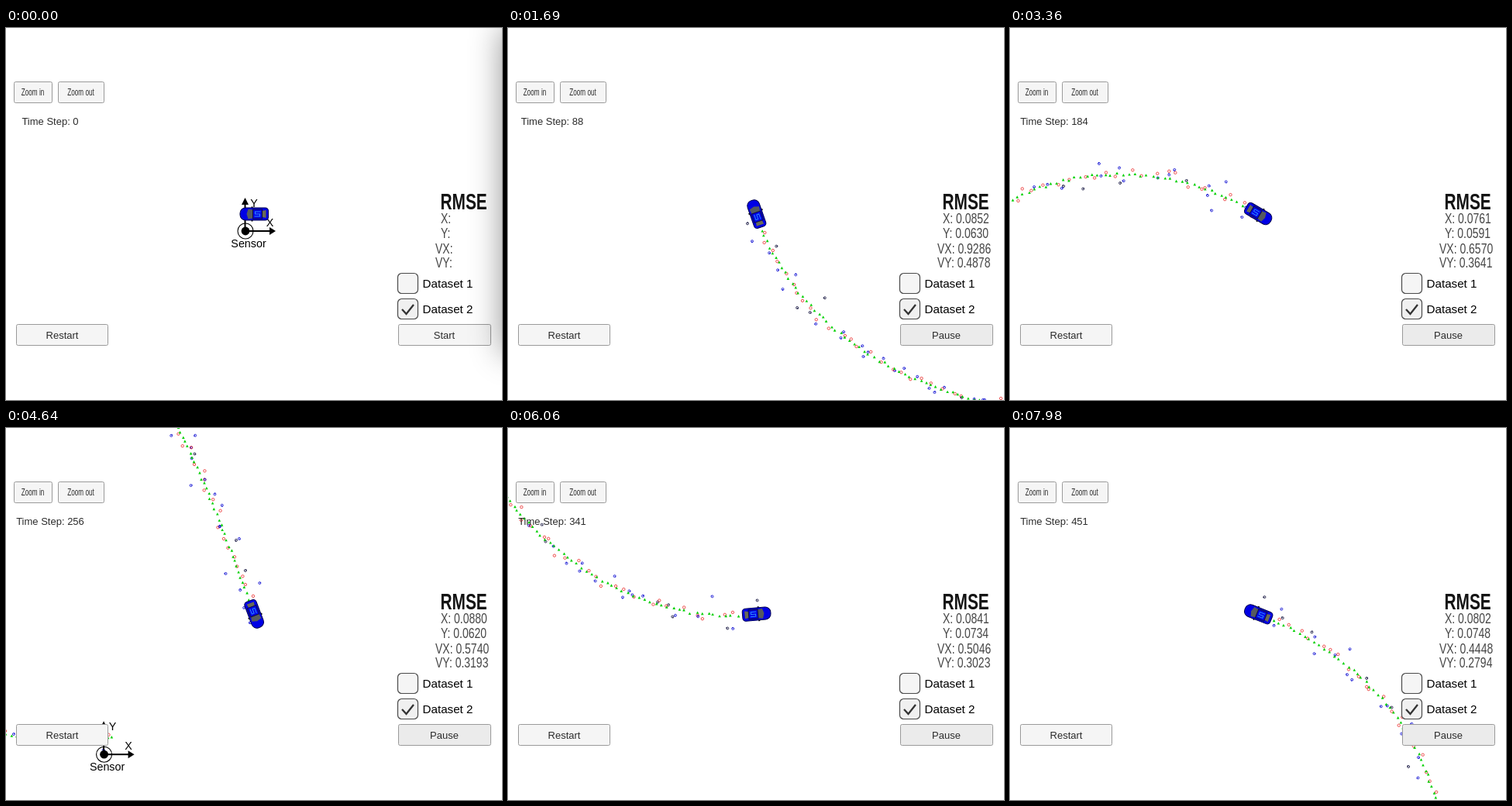
An HTML page with a canvas for the animation above (8 s loop, 640 px wide and 480 px high).

```html
<!DOCTYPE html>
<html lang="en">
<head>
<meta charset="utf-8">
<title>Sensor tracking</title>
<style>
  html, body { margin: 0; width: 100%; height: 100%; overflow: hidden; background: #fff; }
  #stage { position: relative; width: 640px; height: 480px; overflow: hidden; }
  canvas, svg { position: absolute; left: 0; top: 0; display: block; }
  text { font-family: "Liberation Sans", Arial, sans-serif; fill: #2c2c2c; }
  .button { fill: #f5f5f5; stroke: #9a9a9a; }
  .box { fill: #f5f5f5; stroke: #4a4a4a; stroke-width: 1.2; }
  .label { font-size: 13px; text-anchor: middle; }
  .small { font-size: 12px; text-anchor: middle; }
  .option { font-size: 15.2px; fill: #000; }
  .value { font-size: 17.5px; fill: #464646; }
  .title { font-size: 29px; font-weight: bold; fill: #141414; }
  #shade { position: absolute; left: 640px; top: 0; width: 60px; height: 420px; box-shadow: 0 0 40px rgba(0,0,0,.42); }
</style>
</head>
<body>
<div id="stage">
  <canvas id="world" width="640" height="480"></canvas>
  <svg width="640" height="480" viewBox="0 0 640 480">
    <g class="button">
      <rect x="10.5" y="69.5" width="49" height="27" rx="2"/>
      <rect x="67.5" y="69.5" width="59" height="27" rx="2"/>
      <rect x="13.5" y="382.5" width="118" height="27" rx="2"/>
      <rect id="runBox" x="506.5" y="382.5" width="119" height="27" rx="2"/>
    </g>
    <g class="box">
      <rect x="505.5" y="316.5" width="26" height="26" rx="5"/>
      <rect x="505.5" y="349.5" width="26" height="26" rx="5" style="fill:#f0f0f0"/>
    </g>
    <path d="M511 363L516.5 369L526 357" fill="none" stroke="#333" stroke-width="2.3"/>
    <text class="small" transform="translate(34.5 87) scale(.68 1)">Zoom in</text>
    <text class="small" transform="translate(96.5 87) scale(.68 1)">Zoom out</text>
    <text class="label" x="57" y="125" id="step"></text>
    <text class="label" x="72.5" y="401">Restart</text>
    <text class="label" x="565.5" y="401" id="run"></text>
    <text class="option" x="537.5" y="335">Dataset 1</text>
    <text class="option" x="537.5" y="368">Dataset 2</text>
    <text class="title" transform="translate(560.5 233.5) scale(.72 1)">RMSE</text>
    <text class="value" transform="translate(561 252) scale(.8 1)"></text>
    <text class="value" transform="translate(561 271) scale(.8 1)"></text>
    <text class="value" transform="translate(554 291) scale(.8 1)"></text>
    <text class="value" transform="translate(554 309) scale(.8 1)"></text>
  </svg>
  <div id="shade"></div>
</div>
<script>
const LOOP = 8000, LAST = 452, TAU = Math.PI * 2;
const NAMES = ['X:', 'Y:', 'VX:', 'VY:'];

// time, step, screen updates until the next row, then the four RMSE values
const TABLE = [
  [40, 0, 2, .19, .16, 3.87, 1.73],
  [120, 4, 21, .19, .16, 3.87, 1.73],
  [960, 48, 35, .1073, .0695, 1.2490, .6325],
  [2410, 131, 23, .0749, .0603, .7692, .4184],
  [3360, 184, 31, .0761, .0591, .6570, .3641],
  [4640, 256, 34, .0880, .0620, .5740, .3193],
  [6060, 341, 46, .0841, .0734, .5046, .3023],
  [7980, 451, 1, .0802, .0748, .4448, .2794],
  [8020, 453, 1, .0802, .0748, .4448, .2794]
];

const $ = id => document.getElementById(id);
const ctx = $('world').getContext('2d');
const values = document.querySelectorAll('.value');
const mix = (a, b, u) => a + (b - a) * u;

let seed = 20417;
function random() {
  seed = (seed * 1664525 + 1013904223) >>> 0;
  return seed / 4294967296;
}
const noise = sd => (random() + random() + random() - 1.5) * 2 * sd;

// Yaw rate is one sine wave over 500 steps, speed swings twice in that time.
const heading = k => Math.PI - 2.18 * (1 - Math.cos((k + 1.3) * TAU / 500));
const speed = k => (151 - 6.2 * Math.cos(k * TAU / 250)) * .05;

function makePath() {
  const path = [];
  let x = 11, y = 22;
  for (let k = 0; k <= LAST; k++) {
    path.push({ x, y });
    const mid = k + 1, angle = heading(mid);
    x += speed(mid) * Math.cos(angle);
    y += speed(mid) * Math.sin(angle);
  }
  return path;
}

// Lidar noise is even in all directions, radar noise follows range and bearing.
function measure(p, k) {
  const estimate = { x: p.x + noise(.9), y: p.y + noise(.9) };
  if (k % 2) return { estimate, x: p.x + noise(3.5), y: p.y + noise(3.5) };
  const range = Math.hypot(p.x, p.y) + noise(9);
  const bearing = Math.atan2(p.y, p.x) + noise(.018);
  return {
    estimate, radar: true, dark: random() < .2, tilt: random() * TAU,
    x: range * Math.cos(bearing), y: range * Math.sin(bearing)
  };
}

const path = makePath();
const trail = path.map(measure);

function shape(color, points) {
  ctx.fillStyle = color;
  ctx.beginPath();
  points.forEach(([x, y]) => ctx.lineTo(x, y));
  ctx.fill();
}

function ring(x, y, r, color, width) {
  ctx.strokeStyle = color;
  ctx.lineWidth = width;
  ctx.beginPath();
  ctx.arc(x, y, r, 0, TAU);
  ctx.stroke();
}

function drawTrail(count) {
  for (let k = 1; k <= count; k++) {
    const m = trail[k], x = m.x, y = -m.y;
    if (m.radar) {
      const color = m.dark ? '#000030' : '#0000d0';
      ring(x, y, 1.5, color, .8);
      ctx.beginPath();
      ctx.moveTo(x, y);
      ctx.lineTo(x + 2 * Math.cos(m.tilt), y + 2 * Math.sin(m.tilt));
      ctx.stroke();
    } else {
      ring(x, y, 1.7, '#e81818', .75);
    }
  }
  for (let k = 0; k <= count; k++) {
    const { x, y } = trail[k].estimate;
    shape('#00d000', [[x - 1.8, 1.6 - y], [x + 1.8, 1.6 - y], [x, -1.8 - y]]);
  }
}

function drawSensor() {
  ring(0, 0, 10, '#000', 1.1);
  ctx.fillStyle = '#000';
  ctx.beginPath();
  ctx.arc(0, 0, 5.4, 0, TAU);
  ctx.fill();
  ctx.fillRect(-1.5, -36, 2, 36);
  ctx.fillRect(0, -1, 33, 2);
  shape('#000', [[-5, -34], [4, -34], [-.5, -43]]);
  shape('#000', [[31, -5], [31, 5], [39, 0]]);
  ctx.font = '14.3px "Liberation Sans", Arial, sans-serif';
  ctx.textAlign = 'center';
  ctx.fillText('Y', 11, -31);
  ctx.fillText('X', 31.5, -6);
  ctx.fillText('Sensor', 4, 21);
}

function drawCar(angle) {
  ctx.save();
  ctx.translate(320.5, 240);
  ctx.rotate(-angle);
  ctx.fillStyle = '#000';
  ctx.fillRect(2, -9.5, 2, 19);
  ctx.fillStyle = '#0000e6';
  ctx.strokeStyle = '#000050';
  ctx.lineWidth = 1;
  ctx.beginPath();
  ctx.roundRect(-18, -8, 36.5, 16, [4, 7, 7, 4]);
  ctx.fill();
  ctx.stroke();
  shape('#555a60', [[2, -5.5], [8, -6.5], [10, 0], [8, 6.5], [2, 5.5]]);
  shape('#6a6a58', [[-15, -5], [-10, -4], [-10, 4], [-15, 5]]);
  ctx.strokeStyle = '#101040';
  ctx.strokeRect(-10, -6, 12, 12);
  ctx.strokeStyle = '#2f8cff';
  ctx.beginPath();
  ctx.moveTo(0, -3);
  ctx.lineTo(-7, -3);
  ctx.lineTo(-7, 0);
  ctx.lineTo(-1, 0);
  ctx.lineTo(-1, 3);
  ctx.lineTo(-8, 3);
  ctx.stroke();
  ctx.restore();
}

function stateAt(t) {
  let i = TABLE.length - 2;
  while (i > 0 && t < TABLE[i][0]) i--;
  const a = TABLE[i], b = TABLE[i + 1];
  const part = Math.max(0, (t - a[0]) / (b[0] - a[0]));
  const u = Math.floor(part * a[2] + .001) / a[2];
  const step = Math.min(LAST, Math.round(mix(a[1], b[1], u)));
  // The sum of squared errors grows evenly between rows.
  const rmse = NAMES.map((_, n) => {
    const sum = row => row[n + 3] ** 2 * row[1];
    return step ? Math.sqrt(mix(sum(a), sum(b), u) / mix(a[1], b[1], u)) : 0;
  });
  return { step, rmse };
}

function render(t) {
  const { step, rmse } = stateAt(t);
  const p = path[step];
  ctx.clearRect(0, 0, 640, 480);
  ctx.save();
  ctx.translate(320 - p.x, 240 + p.y);
  if (step) drawTrail(step);
  drawSensor();
  ctx.restore();
  drawCar(heading(step));

  $('step').textContent = 'Time Step: ' + step;
  $('run').textContent = step ? 'Pause' : 'Start';
  $('runBox').style.fill = step ? '#ebebeb' : '#f5f5f5';
  values.forEach((el, n) => {
    el.textContent = step ? NAMES[n] + ' ' + rmse[n].toFixed(4) : NAMES[n];
  });
  $('shade').style.opacity = Math.max(0, Math.min(1, 1 - (t - 80) / 250));
}

const start = performance.now();
function tick() {
  render((performance.now() - start) % LOOP);
  requestAnimationFrame(tick);
}
tick();
</script>
</body>
</html>
```
